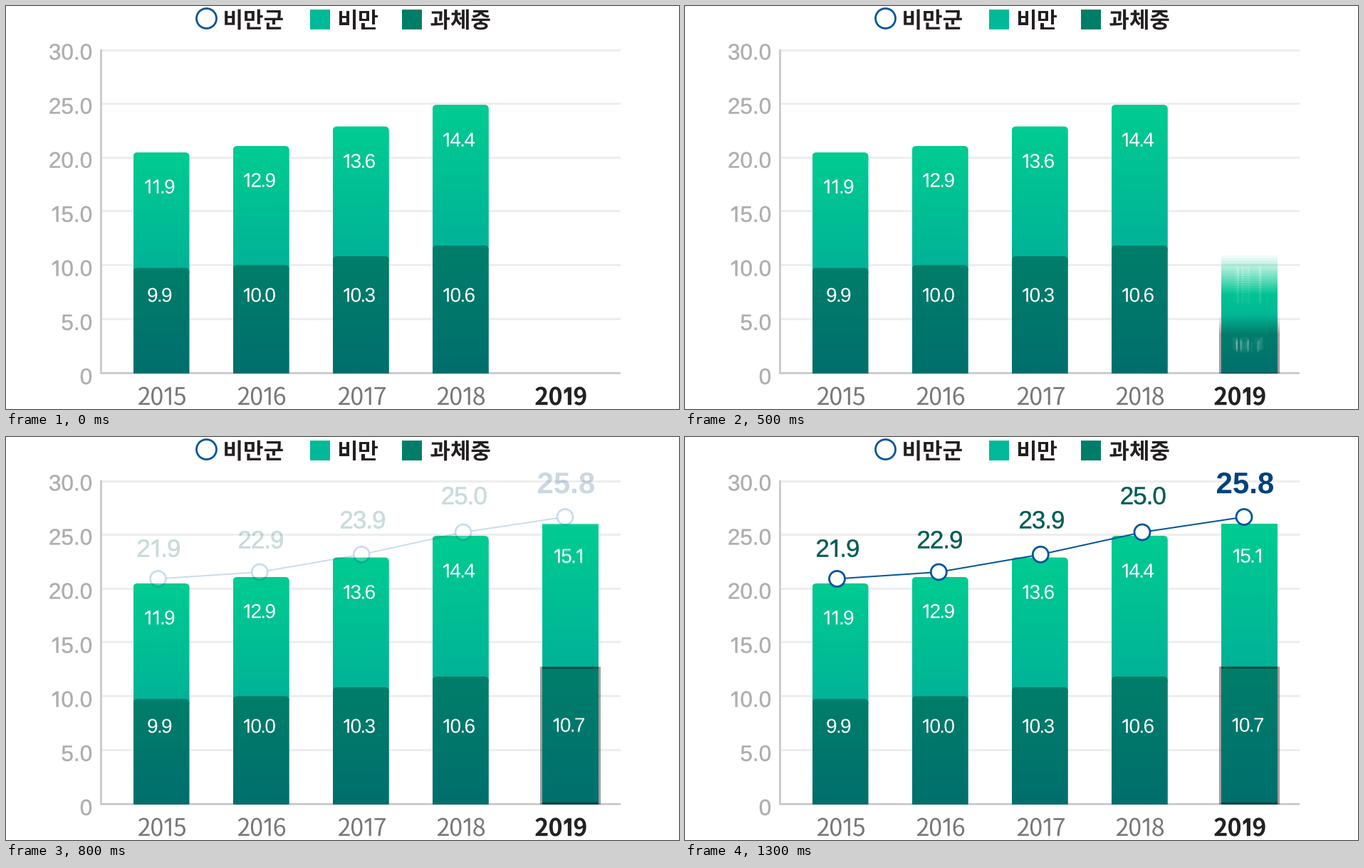
Animation, 945 px wide and 567 px high, one loop 1.5 s. Source, as a matplotlib script:

```python
import matplotlib.pyplot as plt
import numpy as np
from matplotlib.animation import FuncAnimation
from matplotlib.patches import Circle, PathPatch, Rectangle
from matplotlib.path import Path
from matplotlib.textpath import TextPath
from matplotlib.transforms import Affine2D

W, H, DPI = 945, 567, 72  # at 72 dpi one point is one pixel
STEP = 100

SANS, CJK = "Liberation Sans", "Noto Sans CJK JP"
LIGHT = np.array([[0, 204, 145], [0, 178, 152]]) / 255
DARK = np.array([[0, 126, 106], [0, 111, 109]]) / 255
BLUE, NAVY, PINE = "#00559b", "#00427a", "#005b55"
BASE = 517

fig = plt.figure(figsize=(W / DPI, H / DPI), dpi=DPI, facecolor="white")
ax = fig.add_axes([0, 0, 1, 1])
ax.axis("off")


# ---- text -------------------------------------------------------------

def plain_one(x, size, font, bold):
    """A numeral one without a foot."""
    h = 0.733 if font == CJK else 0.69
    w = 0.15 if bold else 0.088
    l, r = 0.08, 0.385 if bold else 0.345
    pts = [(r, 0), (r, h), (r - w, h), (l, h - 0.13), (l, h - 0.13 - w),
           (r - w, h - w - 0.02), (r - w, 0), (r, 0)]
    return Path(np.array(pts) * size + (x, 0), closed=True)


def advance(c, font, bold):
    if c == "1":
        return 0.47
    if c == ".":
        return 0.278
    if not c.isdigit():
        return 0.92
    return 0.583 if font == CJK and bold else 0.556


def glyphs(s, x, y, size, font=SANS, bold=False, track=0, align=0.5):
    """Outline of s, its ink box placed at x (by align) and centred on y."""
    prop = dict(family=font, weight="bold" if bold else "normal")
    parts, pen = [], 0
    for c in s:
        if c == "1":
            parts.append(plain_one(pen, size, font, bold))
        else:
            parts.append(TextPath((pen, 0), c, size=size, prop=prop))
        pen += advance(c, font, bold) * size + track
    path = Path.make_compound_path(*parts)
    box = path.get_extents()
    left = box.x0 + align * box.width
    mid = (box.y0 + box.y1) / 2
    return Affine2D().translate(-left, -mid).scale(1, -1).translate(x, y).transform_path(path)


def write(s, x, y, size, color, weight=0, z=5, **kw):
    patch = PathPatch(glyphs(s, x, y, size, **kw), fc=color, lw=weight,
                      ec=color if weight else "none", zorder=z)
    return ax.add_patch(patch)


def value_path(s, x, y):
    return glyphs(s, x, y, 28, track=-1.7)


# ---- still parts ------------------------------------------------------

def rect(x0, y0, x1, y1, color, z=1):
    ax.add_patch(Rectangle((x0, y0), x1 - x0, y1 - y0, fc=color, lw=0, zorder=z))


def ramp(colors, n):
    k = np.linspace(0, 1, n)[:, None]
    return colors[0] * (1 - k) + colors[1] * k


def block(x0, x1, top, bottom, colors, z, r=6):
    """Gradient block with rounded top corners."""
    img = ax.imshow(ramp(colors, 128)[:, None, :], extent=(x0, x1, bottom, top),
                    aspect="auto", interpolation="bilinear", zorder=z)
    verts = [(x0, bottom), (x0, top + r), (x0, top), (x0 + r, top), (x1 - r, top),
             (x1, top), (x1, top + r), (x1, bottom), (x0, bottom)]
    M, L, Q = Path.MOVETO, Path.LINETO, Path.CURVE3
    img.set_clip_path(Path(verts, [M, L, Q, Q, L, Q, Q, L, L]), ax.transData)


def legend():
    ax.add_patch(Circle((281.5, 17.5), 14, fc="white", ec=BLUE, lw=2.8, zorder=5))
    rect(427, 5, 455, 33, "#00b998")
    rect(556, 5, 584, 33, "#007d69")
    for s, x in (("비만군", 348), ("비만", 495), ("과체중", 638)):
        write(s, x, 19, 31, "#231f20", font=CJK, bold=True)


def axes():
    for i in range(7):
        y = 62 + 75.65 * i
        if i < 6:
            rect(134, y - 1.5, 863, y + 1.5, "#ededed")
        label = f"{30 - 5 * i:.1f}" if i < 6 else "0"
        write(label, 120, 64.5 + 76.1 * i, 31.5, "#adadad", 0.4, align=1)
    rect(131.5, 60.5, 134.5, 517.5, "#cccccc", 2)
    rect(131.5, 514.5, 863, 517.5, "#cccccc", 2)
    for year, x in zip(range(2015, 2019), (219, 359, 500, 639)):
        write(str(year), x, 548.7, 34, "#777777", font=CJK, track=-1.2)
    write("2019", 779, 548.7, 34, "#222222", font=CJK, bold=True, track=-0.5)


def still_bars():
    # left edge, top, top of dark part, value height, values
    rows = [(178.5, 206, 368.5, 254, "11.9", "9.9"),
            (318.7, 197, 364.5, 245, "12.9", "10.0"),
            (458.8, 169.5, 352, 218, "13.6", "10.3"),
            (598.8, 139, 337, 188, "14.4", "10.6")]
    for x, top, split, y, upper, lower in rows:
        block(x, x + 79, top, split + 8, LIGHT, 3)
        block(x, x + 79, split, BASE, DARK, 4)
        for s, ty in ((upper, y), (lower, 406.5)):
            ax.add_patch(PathPatch(value_path(s, x + 37.3, ty), fc="white", lw=0, zorder=6))


# ---- growing bar ------------------------------------------------------

BX, BY, BW = 746, 118, 94
BH = BASE - BY


def coverage(path, n=3):
    xs = BX + (np.arange(BW * n) + 0.5) / n
    ys = BY + (np.arange(BH * n) + 0.5) / n
    pts = np.stack(np.meshgrid(xs, ys), -1).reshape(-1, 2)
    inside = np.zeros(len(pts), bool)
    for poly in path.to_polygons():
        inside ^= Path(poly).contains_points(pts)
    return inside.reshape(BH, n, BW, n).mean((1, 3))


def bar_image():
    """Finished bar as premultiplied RGBA."""
    img = np.zeros((BH, BW, 4))
    l, r = 753 - BX, 832 - BX
    top, split = 122 - BY, 323 - BY
    img[top:, l:r, 3] = 1
    img[top:split, l:r, :3] = ramp(LIGHT, split - top)[:, None]
    img[split:, l:r, :3] = ramp(DARK, BH - split)[:, None]
    frame = np.zeros((BH, BW, 1))
    frame[split:, l - 3:r + 3] = 0.38
    frame[split + 3:-3, l:r] = 0
    img = img * (1 - frame)
    img[..., 3:] += frame
    for s, x, y in (("15.1", 789.5, 167), ("10.7", 790.3, 405)):
        m = coverage(value_path(s, x, y))[..., None]
        img = img * (1 - m) + m
    return img


bar_sum = np.concatenate([np.zeros((1, BW, 4)), np.cumsum(bar_image(), 0)])
SHUTTER = ((np.arange(16) + 0.5) / 16 - 0.5) * 0.1


def squash(s):
    """Bar scaled to height s from its foot."""
    src = np.clip(BH - (BH - np.arange(BH + 1)) / s, 0, BH)
    i = np.minimum(src.astype(int), BH - 1)
    f = (src - i)[:, None, None]
    return np.diff(bar_sum[i] * (1 - f) + bar_sum[i + 1] * f, axis=0) * s


def grown(p):
    """Motion-blurred bar at progress p."""
    acc = np.zeros((BH, BW, 4))
    for q in np.clip(p + SHUTTER, 0, 1):
        s = q * q * (3 - 2 * q)
        if s > 1e-5:
            acc += squash(s)
    acc /= len(SHUTTER)
    acc[..., :3] /= np.maximum(acc[..., 3:], 1e-6)
    return np.clip(acc, 0, 1)


# ---- totals line ------------------------------------------------------

def totals():
    pts = np.array([(213.5, 199.5), (356.3, 190), (499.3, 165.3), (642, 134), (785, 112.5)])
    parts = []
    for a, b in zip(pts[:-1], pts[1:]):
        gap = (b - a) / np.hypot(*(b - a)) * 12
        parts += ax.plot(*np.transpose([a + gap, b - gap]), color=BLUE, lw=2,
                         solid_capstyle="butt", zorder=7)
    for p in pts:
        parts.append(ax.add_patch(Circle(p, 9.8, fc="white", lw=0, zorder=8)))
        parts.append(ax.add_patch(Circle(p, 11, fill=False, ec=BLUE, lw=2.8, zorder=9)))
    for s, x, y in (("21.9", 214.5, 156.5), ("22.9", 358, 144.5),
                    ("23.9", 501, 116.5), ("25.0", 643.5, 82.5)):
        parts.append(write(s, x, y, 35, PINE, 0.4, z=9, track=-1))
    parts.append(write("25.8", 786.5, 64.7, 42, NAVY, z=9, bold=True))
    return parts


legend()
axes()
still_bars()
bar = ax.imshow(np.zeros((BH, BW, 4)), extent=(BX, BX + BW, BASE, BY),
                aspect="auto", interpolation="nearest", zorder=5)
line = totals()
ax.set_xlim(0, W)
ax.set_ylim(H, 0)


def update(k):
    t = k * STEP
    bar.set_data(grown((t - 300) / 500))
    alpha = np.interp(t, [700, 1100, 1300], [0, 0.82, 1])
    for part in line:
        part.set_alpha(alpha)
    return [bar, *line]


anim = FuncAnimation(fig, update, frames=15, interval=STEP, repeat=True, repeat_delay=0)
plt.show()
```
